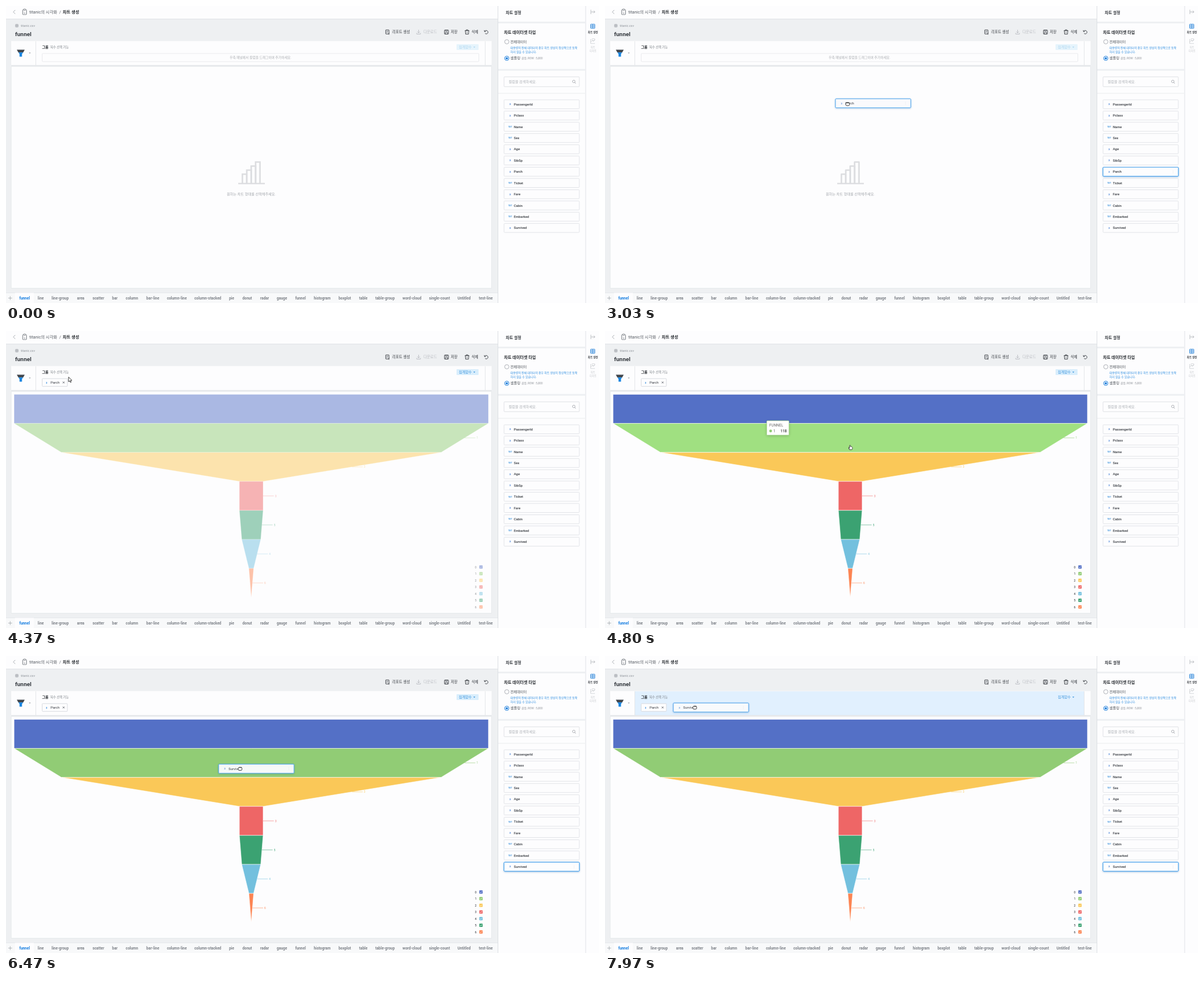
An HTML page with a canvas for the animation above (8 s loop, 1024x513 px).

```html
<!DOCTYPE html>
<html lang="ko">
<head>
<meta charset="utf-8">
<title>funnel</title>
<style>
html, body { margin: 0; width: 100%; height: 100%; overflow: hidden; background: #fdfdfe; }
canvas { display: block; width: 1024px; height: 513px; }
</style>
</head>
<body>
<canvas id="stage"></canvas>
<script>
const W = 1024, H = 513, LOOP = 8000;
const canvas = document.getElementById('stage');
const ctx = canvas.getContext('2d');
const dpr = window.devicePixelRatio || 1;
canvas.width = W * dpr;
canvas.height = H * dpr;

const FONT = 'Roboto, "Noto Sans CJK KR", "Noto Sans CJK", sans-serif';
const WHITE = '#fdfdfe', INK = '#33373d', GRAY = '#a3a7ad', LINE = '#e4e6ea', BLUE = '#1e7fd8';

const COLUMNS = ['PassengerId', 'Pclass', 'Name', 'Sex', 'Age', 'SibSp', 'Parch', 'Ticket', 'Fare', 'Cabin', 'Embarked', 'Survived'];
const TEXTUAL = ['Name', 'Sex', 'Ticket', 'Cabin', 'Embarked'];
const TABS = [['funnel', 32], ['line', 60], ['line-group', 93.5], ['area', 129], ['scatter', 159.5], ['bar', 188],
  ['column', 217.5], ['bar-line', 253.5], ['column-line', 295], ['column-stacked', 348.5], ['pie', 389.5],
  ['donut', 416.5], ['radar', 446.5], ['gauge', 476.5], ['funnel', 508.5], ['histogram', 546], ['boxplot', 585],
  ['table', 617], ['table-group', 654.5], ['word-cloud', 701], ['single-count', 748.5], ['Untitled', 791], ['test-line', 828.5]];
const COLORS = ['#5470c6', '#91cc75', '#fac858', '#ee6666', '#73c0de', '#3ba272', '#fc8452'];
const HOVER = ['#5c7bda', '#a0e081', '#ffdc61', '#ff7070', '#7fd3f4', '#41b27d', '#ff915a'];
const SLICES = [[0, 678], [1, 118], [2, 80], [3, 5], [5, 5], [4, 4], [6, 1]];
const CHART = { mid: 423.5, width: 819, top: 109.5, step: 50.1 };
const ROW = { x: 860, y: 162, w: 130, h: 15.5, step: 19.42 };

// moments of the interaction, in ms
const SHOW = 450, GRAB1 = 2600, DROP1 = 3750, CHIP = 4200, DRAWN = 4270, GRAB2 = 5970;
// cursor hotspot: time, x, y, eased
const PATH = [
  [SHOW, 34, 503], [880, 34, 503], [1650, 884, 229, 1], [1840, 880, 336], [1920, 880, 340],
  [2340, 880, 285.5, 1], [GRAB1, 880, 285.5], [3350, 124, 92, 1], [3700, 108, 79.5, 1], [4450, 108, 79.5],
  [4800, 422, 197], [5260, 850, 349], [5700, 896, 362, 1], [GRAB2, 896, 362], [6770, 177, 115, 1],
  [7000, 163, 99, 1], [7450, 154, 87.5, 1], [LOOP, 154, 87]
];

const clamp = v => Math.max(0, Math.min(1, v));
const mix = (a, b, k) => a + (b - a) * k;
const outCubic = k => 1 - (1 - clamp(k)) ** 3;

function cursorAt(t) {
  let i = 1;
  while (i < PATH.length - 1 && t > PATH[i][0]) i++;
  const a = PATH[i - 1], b = PATH[i];
  let k = clamp((t - a[0]) / (b[0] - a[0]));
  if (b[3]) k = k * k * (3 - 2 * k);
  return { x: mix(a[1], b[1], k), y: mix(a[2], b[2], k) };
}

function text(str, x, y, size, color = INK, weight = 400, align = 'left') {
  ctx.font = `${weight} ${size}px ${FONT}`;
  ctx.textAlign = align;
  ctx.fillStyle = color;
  ctx.fillText(str, x, y + size * 0.36);
}
function rect(x, y, w, h, color) {
  ctx.fillStyle = color;
  ctx.fillRect(x, y, w, h);
}
function box(x, y, w, h, fill, stroke, r = 1, lw = 1) {
  ctx.beginPath();
  ctx.roundRect(x, y, w, h, r);
  if (fill) { ctx.fillStyle = fill; ctx.fill(); }
  if (stroke) { ctx.lineWidth = lw; ctx.strokeStyle = stroke; ctx.stroke(); }
}
function trace(pts) {
  ctx.beginPath();
  for (let i = 0; i < pts.length; i += 2) ctx.lineTo(pts[i], pts[i + 1]);
}
function line(color, lw, ...pts) {
  trace(pts);
  ctx.strokeStyle = color;
  ctx.lineWidth = lw;
  ctx.stroke();
}
function shape(color, ...pts) {
  trace(pts);
  ctx.closePath();
  ctx.fillStyle = color;
  ctx.fill();
}
function ring(x, y, r, color, lw, from = 0, to = Math.PI * 2) {
  ctx.beginPath();
  ctx.arc(x, y, r, from, to);
  ctx.strokeStyle = color;
  ctx.lineWidth = lw;
  ctx.stroke();
}
function dot(x, y, r, color) {
  ctx.beginPath();
  ctx.arc(x, y, r, 0, Math.PI * 2);
  ctx.fillStyle = color;
  ctx.fill();
}
function shadow(color, blur, dy) {
  ctx.shadowColor = color;
  ctx.shadowBlur = blur * dpr;
  ctx.shadowOffsetY = dy * dpr;
}
function tableIcon(x, y, s, color, lw) {
  box(x - s, y - s, 2 * s, 2 * s, null, color, 0.5, lw);
  line(color, lw, x - s, y - s / 3, x + s, y - s / 3);
  line(color, lw, x - s, y + s / 3, x + s, y + s / 3);
  line(color, lw, x, y - s, x, y + s);
}

function header() {
  rect(0, 0, 849, 22.5, WHITE);
  rect(0, 22, 849, 1, '#e0e3e7');
  line('#a3a7ad', 0.9, 16, 7, 12.5, 10.3, 16, 13.6);
  box(28.7, 6.5, 6.8, 8.3, null, '#70757c', 0.8, 0.9);
  box(30.3, 5.2, 3.6, 2.2, WHITE, '#70757c', 0.4, 0.8);
  line('#70757c', 0.7, 30.5, 10, 31.5, 10);
  line('#70757c', 0.7, 30.5, 12.3, 33.6, 12.3);
  text('titanic의 시각화', 40.3, 10.5, 7.2, '#555a61');
  text('/', 92, 10.5, 7, '#555a61');
  text('차트 생성', 98, 10.5, 7.2, '#25292e', 700);
  tableIcon(18.7, 34, 2.3, '#8f949b', 0.6);
  text('titanic.csv', 25.5, 34, 5.4, '#8f949b');
  text('funnel', 15.8, 48.3, 9.9, '#33373d', 700);
}

function toolbar() {
  const y = 45;
  box(655.7, 41.3, 5.6, 7, null, INK, 0.5, 0.9);
  line(INK, 0.7, 657, 43.7, 660, 43.7);
  line(INK, 0.7, 657, 45.7, 659, 45.7);
  line(INK, 0.8, 661.3, 46, 661.3, 49.5);
  text('리포트 생성', 667, y, 6.3, INK, 500);
  const pale = '#b9bcc1';
  line(pale, 0.9, 712.5, 41, 712.5, 46.5);
  line(pale, 0.9, 710.3, 44.3, 712.5, 46.5, 714.7, 44.3);
  line(pale, 0.9, 709.2, 46.5, 709.2, 48.5, 715.8, 48.5, 715.8, 46.5);
  text('다운로드', 721, y, 6.3, pale, 500);
  box(757.2, 41.5, 6.8, 7, null, INK, 0.5, 0.9);
  box(759, 41.5, 3, 2.2, null, INK, 0, 0.7);
  box(758.8, 45.6, 3.7, 2.9, null, INK, 0, 0.7);
  text('저장', 768, y, 6.3, INK, 500);
  line(INK, 0.9, 792.3, 42.6, 800, 42.6);
  line(INK, 0.9, 794.6, 42.3, 794.6, 41.2, 797.7, 41.2, 797.7, 42.3);
  line(INK, 0.9, 793.2, 42.6, 793.6, 48.6, 798.7, 48.6, 799.1, 42.6);
  line(INK, 0.6, 796.1, 44.3, 796.1, 47);
  text('삭제', 804, y, 6.3, INK, 500);
  ring(829.3, 45.2, 3, INK, 0.9, -2.7, 2.3);
  line(INK, 0.9, 826, 41.8, 826.3, 44.3, 828.7, 44);
}

function settings(t, over) {
  const filled = t >= CHIP;
  rect(9, 60.5, 829.5, 41.5, WHITE);
  if (over) rect(52, 61, 775, 41, '#e1f0fe');
  ctx.lineWidth = 1;
  rect(51, 61, 1, 41, LINE);
  rect(827, 61, 1, 41, LINE);
  rect(9, 102, 829.5, 1, '#e0e3e6');
  shape('#42474d', 18.7, 75.6, 32.3, 75.6, 29.7, 80.2, 21.3, 80.2);
  shape('#1583e0', 21.5, 80.2, 29.5, 80.2, 27.6, 83, 27.6, 87.4, 23.4, 87.4, 23.4, 83);
  shape('#8d9299', 39.6, 80.5, 42.6, 80.5, 41.1, 82.2);
  text('그룹', 62.2, 71, 6, '#25292e', 700);
  text('복수 선택 가능', 76.5, 71, 5.3, '#7b8087');
  if (!over || !filled) box(778, 66, 38, 10, filled ? '#d9eefc' : '#e6f4fc', null, 1);
  const tint = filled ? '#3491dc' : '#a9d4ef';
  text('집계함수', 782, 71, 6, tint, 500);
  shape(tint, 807, 70.2, 810.4, 70.2, 808.7, 72.2);
  if (filled) {
    box(62.5, 82.2, 43.5, 13.5, WHITE, '#d8dbe0');
    text('3', 70, 89, 4.3, BLUE, 700, 'center');
    text('Parch', 77, 88.8, 6, INK);
    line('#555a61', 0.9, 98, 87.4, 101, 90.4);
    line('#555a61', 0.9, 101, 87.4, 98, 90.4);
  } else {
    box(62.5, 82, 754, 14, null, '#eaebee');
    text('우측 패널에서 칼럼을 드래그하여 추가하세요.', 439.5, 88.8, 5.7, '#a8abb0', 400, 'center');
  }
}

function emptyChart() {
  const c = '#dcdde0';
  rect(401, 305.5, 46, 2.3, c);
  for (let i = 0; i < 4; i++) {
    const x = 408.2 + i * 7.6, top = 290.5 - i * 7;
    line(c, 2.6, x, 306, x, top, x + 7.6, top, x + 7.6, 306);
  }
  text('원하는 차트 형태를 선택해주세요.', 423.5, 325, 6.1, GRAY, 400, 'center');
}

const sliceWidth = i => i < SLICES.length ? CHART.width * Math.min(100, SLICES[i][1]) / 100 : 0;

function hitSlice(p) {
  const v = (p.y - CHART.top) / CHART.step, i = Math.floor(v);
  if (i < 0 || i >= SLICES.length) return -1;
  const half = mix(sliceWidth(i), sliceWidth(i + 1), v - i) / 2;
  return Math.abs(p.x - CHART.mid) < half ? i : -1;
}

function funnel(t, active) {
  ctx.globalAlpha = outCubic((t - DRAWN) / 500);
  SLICES.forEach(([id], i) => {
    const y = CHART.top + i * CHART.step, b = y + CHART.step;
    const w = sliceWidth(i) / 2, v = sliceWidth(i + 1) / 2, m = CHART.mid;
    shape(i === active ? HOVER[id] : COLORS[id], m - w, y, m + w, y, m + v, b, m - v, b);
    ctx.lineWidth = 0.6;
    ctx.strokeStyle = '#fff';
    ctx.stroke();
    if (!i) return;
    const edge = m + (w + v) / 2, cy = y + CHART.step / 2;
    line(COLORS[id], 0.6, edge, cy, edge + 18.5, cy);
    text(id, edge + 20.5, cy, 4.6, COLORS[id]);
  });
  COLORS.forEach((color, i) => {
    const y = 407.7 + i * 11.48;
    text(i, 811, y, 5.6, INK, 400, 'center');
    box(817.3, y - 2.9, 5.8, 5.8, color, null, 1);
    line('#fff', 0.8, 818.6, y, 819.8, y + 1.2, 822, y - 1.2);
  });
  ctx.globalAlpha = 1;
}

function tooltip(t) {
  const p = cursorAt(t - 183), target = cursorAt(Math.min(t, 4930));
  const slice = hitSlice(target);
  const alpha = Math.min(clamp((t - 4530) / 120), clamp((5080 - t) / 120));
  if (slice < 0 || !alpha) return;
  const [id, count] = SLICES[slice], x = p.x + 20.5, y = p.y + 19;
  ctx.save();
  ctx.globalAlpha = alpha;
  shadow('rgba(0,0,0,.2)', 5, 1);
  box(x, y, 38.5, 25, '#fff', null, 1.5);
  ctx.restore();
  ctx.save();
  ctx.globalAlpha = alpha;
  box(x, y, 38.5, 25, '#fff', COLORS[id], 1.5, 0.7);
  text('FUNNEL', x + 4.5, y + 7.5, 6.4, '#666');
  dot(x + 6.8, y + 17.8, 2.4, COLORS[id]);
  text(id, x + 11.5, y + 17.8, 6.4, '#666');
  text(count, x + 34.8, y + 17.8, 6.4, '#555', 700, 'right');
  ctx.restore();
}

function tabs() {
  rect(0, 495, 849, 18, '#f8f9fa');
  rect(0, 495, 849, 0.8, '#e1e4e8');
  rect(15.5, 495.5, 32.5, 17.5, WHITE);
  line('#a3a7ad', 0.8, 4, 504.5, 10.5, 504.5);
  line('#a3a7ad', 0.8, 7.25, 501.2, 7.25, 507.8);
  TABS.forEach(([name, x], i) => text(name, x, 504.5, 6.4, i ? '#7c8087' : '#0f7ae0', 700, 'center'));
}

function sidePanel() {
  rect(849, 0, 175, H, WHITE);
  rect(849, 0, 1, H, '#dcdfe3');
  rect(1000.5, 0, 1, H, '#e0e2e6');
  rect(850, 27, 150.5, 3, '#eef0f3');
  rect(850, 108.7, 150.5, 3, '#eef0f3');
  rect(850, 150, 150.5, 1.5, '#f1f2f4');
  text('차트 설정', 863, 12, 6.8, INK, 700);
  text('차트 데이터셋 타입', 860, 45.5, 7, '#25292e', 700);
  ring(864.8, 61.8, 3.7, '#9a9ea5', 0.8);
  text('전체데이터', 871, 61.6, 6.1, '#4a4f56');
  text('대용량의 전체 데이터의 경우 차트 생성이 정상적으로 동작', 871, 72, 4.87, '#2b8ce0');
  text('하지 않을 수 있습니다.', 871, 79, 4.87, '#2b8ce0');
  ring(864.8, 90.3, 3.7, '#1a7cdb', 1);
  dot(864.8, 90.3, 1.9, '#1a7cdb');
  text('샘플링', 871, 90, 6.2, '#4a4f56');
  text('권장, ROW : 5,000', 890, 90.2, 4.8, '#8d9198');
  box(860, 122.3, 130, 17, WHITE, '#dfe1e5');
  text('컬럼을 검색하세요.', 868, 130.8, 6.1, '#a9adb3');
  ring(980.5, 130.3, 2.2, '#8d9198', 0.7);
  line('#8d9198', 0.7, 982, 132, 984, 134);

  line('#a9adb3', 0.8, 1010, 6.5, 1010, 14);
  line('#a9adb3', 0.8, 1010.5, 10.2, 1017, 10.2);
  line('#a9adb3', 0.8, 1014.8, 8, 1017, 10.2, 1014.8, 12.4);
  tableIcon(1013.2, 35, 3.6, '#2582d8', 0.9);
  text('차트 설정', 1013.5, 45, 4.4, INK, 700, 'center');
  const pale = '#c3c6cb';
  line(pale, 0.7, 1009.6, 57, 1009.6, 64.8, 1017, 64.8);
  line(pale, 0.7, 1010, 62, 1012.5, 59.5, 1014.3, 61.3, 1017, 57.5);
  box(1012, 56.5, 4.6, 3, null, pale, 0.3, 0.6);
  text('차트', 1013.5, 71, 4.4, pale, 400, 'center');
  text('디자인', 1013.5, 77.5, 4.4, pale, 400, 'center');
}

function column(name, x, y, lit) {
  if (lit) {
    ctx.save();
    shadow('rgba(40,110,180,.35)', 3, 1);
    box(x, y, ROW.w, ROW.h, WHITE, '#4ba3ec', 1.2);
    ctx.restore();
  }
  box(x, y, ROW.w, ROW.h, WHITE, lit ? '#4ba3ec' : '#e2e4e8', 1.2);
  const cy = y + ROW.h / 2, txt = TEXTUAL.includes(name);
  text(txt ? 'TXT' : '3', x + 10.5, cy, txt ? 3.6 : 4.3, txt ? '#3d92dc' : '#2c6fd0', 700, 'center');
  text(name, x + 17, cy - 0.1, 5.8, INK, 500);
  if (lit) for (let i = -1; i < 2; i++) dot(x + 121, cy + i * 2, 0.45, '#ccd0d5');
}

function arrow({ x, y }) {
  trace([x, y, x, y + 8.2, x + 1.9, y + 6.5, x + 3.2, y + 9.3, x + 4.6, y + 8.7, x + 3.3, y + 5.9, x + 5.8, y + 5.7]);
  ctx.closePath();
  ctx.fillStyle = '#fff';
  ctx.fill();
  ctx.strokeStyle = '#222';
  ctx.lineWidth = 0.9;
  ctx.lineJoin = 'round';
  ctx.stroke();
}
function pointer({ x, y }) {
  box(x - 1.5, y + 2.6, 5.6, 5, '#fff', '#222', 1.4, 0.9);
  box(x - 0.6, y, 1.7, 5, '#fff', '#222', 0.8, 0.8);
  rect(x - 0.2, y + 3, 3.7, 3.5, '#fff');
  line('#222', 0.8, x - 1.2, y + 6, x - 2.3, y + 4.3);
}
function fist({ x, y }) {
  box(x - 2.2, y - 0.2, 6.4, 5, '#fff', '#222', 1.8, 0.9);
  for (let i = 0; i < 3; i++) ring(x + i * 1.5, y + 0.2, 0.8, '#222', 0.7, Math.PI, 0);
}

function draw(t) {
  ctx.setTransform(dpr, 0, 0, dpr, 0, 0);
  const cur = cursorAt(t);
  const first = t >= GRAB1 && t < CHIP, second = t >= GRAB2;
  const held = first ? 'Parch' : second ? 'Survived' : '';
  const over = (t > 3280 && t < DROP1) || t > 7180;
  const names = t < CHIP ? COLUMNS : COLUMNS.filter(n => n !== 'Parch');
  const ready = t >= DRAWN;
  const active = ready && !held ? hitSlice(cur) : -1;

  rect(0, 0, W, H, '#eef0f2');
  header();
  toolbar();
  settings(t, over);
  rect(9, 104.5, 829.5, 383, WHITE);
  box(9, 104.5, 829.5, 383, null, '#e3e6e9', 0, 0.8);
  if (ready) funnel(t, active);
  else emptyChart();
  tabs();
  sidePanel();

  names.forEach((name, i) => {
    const y = ROW.y + i * ROW.step;
    const inside = t >= SHOW && cur.x > ROW.x && cur.x < ROW.x + ROW.w && cur.y > y - 1 && cur.y < y + ROW.h + 1;
    column(name, ROW.x, y, held ? name === held : inside);
  });

  if (held) {
    const grab = cursorAt(first ? GRAB1 : GRAB2);
    let x = ROW.x + cur.x - grab.x;
    let y = ROW.y + names.indexOf(held) * ROW.step + cur.y - grab.y;
    if (first) {
      const k = clamp((t - 3830) / 320), e = k * k * (3 - 2 * k);
      x = mix(x, 62.5, e);
      y = mix(y, 81.5, e);
    }
    ctx.globalAlpha = 0.78;
    column(held, x, y, true);
    ctx.globalAlpha = 1;
  }
  if (ready) tooltip(t);
  if (t < SHOW) return;
  if (held) fist(cur);
  else if (active >= 0) pointer(cur);
  else arrow(cur);
}

const start = performance.now();
function tick() {
  draw((performance.now() - start) % LOOP);
  requestAnimationFrame(tick);
}
tick();
</script>
</body>
</html>
```
